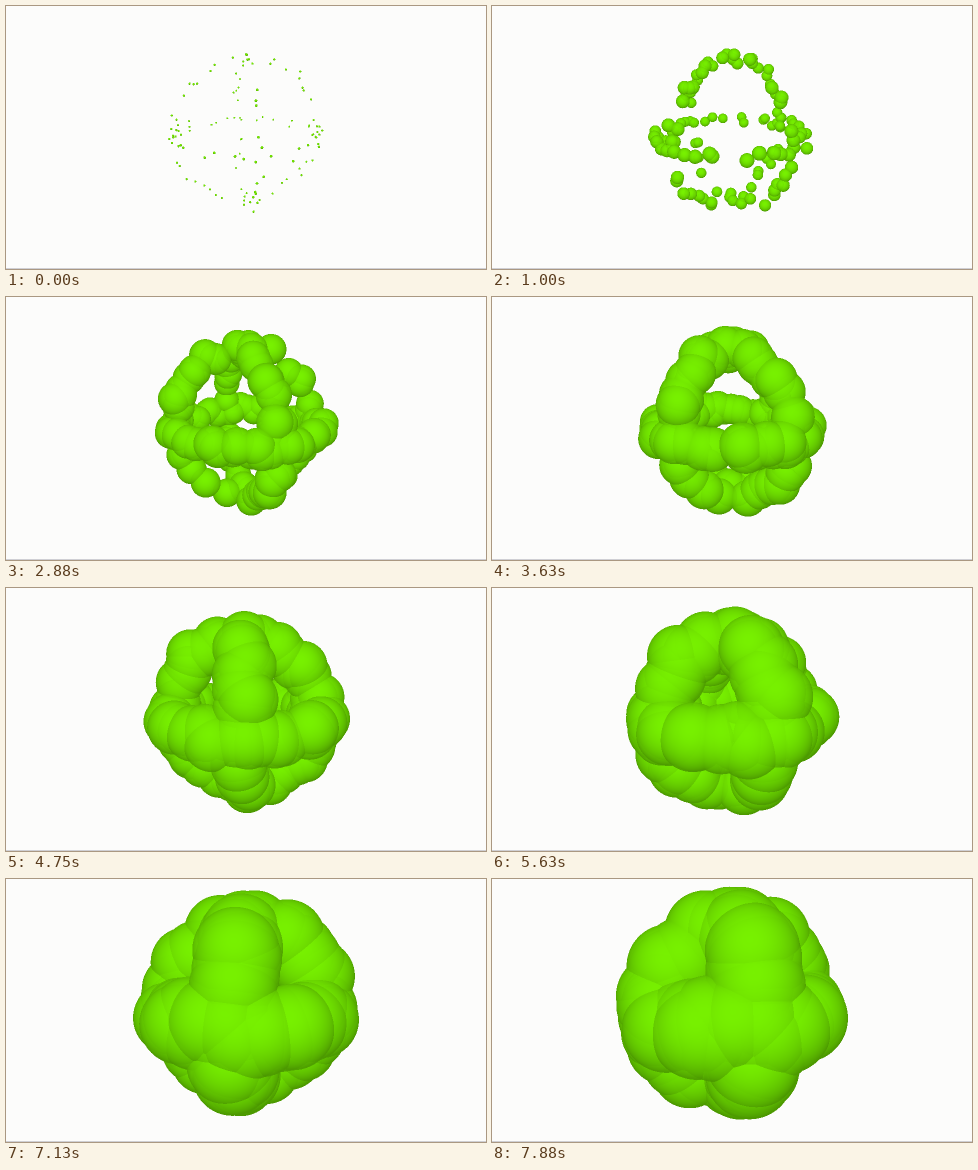
An HTML page with a canvas for the animation above (8 s loop, 480x263 px).

```html
<!DOCTYPE html>
<html lang="en">
<head>
<meta charset="utf-8">
<title>Growing balls on three circles</title>
<style>
  html, body { margin: 0; width: 100%; height: 100%; overflow: hidden; background: #fcfcfb; }
  canvas { display: block; width: 480px; height: 263px; }
  .rule { position: absolute; left: 0; top: 262px; width: 480px; height: 1px; background: #cfcfd4; }
</style>
</head>
<body>
<canvas width="960" height="526"></canvas>
<div class="rule"></div>
<script>
const LOOP = 8000, STEP = 125;
const SCALE = 2, W = 480 * SCALE, H = 263 * SCALE;
const CENTER = { x: 240, y: 128.5 };
const RADIUS = 72, PERSPECTIVE = 0.22, TILT = 0.266;
const LIFT = 0.04;                     // upright circles sit a little higher
const START = 8, SPIN = 4.45;          // degrees, degrees per step
const SIZE = 1.1, GROWTH = 0.59;       // ball radius, growth per step
const NOISE = 0.1;
const BLEND = 0.86;
const GREEN = { r: 122, g: 246 };
const LIGHT = { x: -0.06, y: 0.25, z: 0.966 };

const rad = deg => deg * Math.PI / 180;

let seed = 11;
function random() {
  seed = (seed * 16807) % 2147483647;
  return seed / 2147483647;
}
const jitter = () => (random() + random() - 1) * NOISE;

// Loosely even points on a circle, bunched around `waves` evenly spaced peaks.
// Axes: x to the right, y up, z towards the viewer.
function ring({ count, waves, peak, pull }, place) {
  return Array.from({ length: count }, (_, i) => {
    const u = rad(360 * (i + random()) / count);
    const t = u - pull / waves * Math.sin(waves * (u - rad(peak)));
    return place(Math.cos(t), Math.sin(t)).map(v => v + jitter());
  });
}

function meridian(spread, azimuth) {
  const a = rad(azimuth);
  return ring(spread, (c, s) => [c * Math.sin(a), s + LIFT, c * Math.cos(a)]);
}

const points = [
  ...ring({ count: 44, waves: 2, peak: 90, pull: 0.5 }, (c, s) => [s, 0, c]),
  ...meridian({ count: 36, waves: 2, peak: 150, pull: 0.4 }, START),
  ...meridian({ count: 38, waves: 4, peak: 45, pull: 0.4 }, START + 90)
];

const ctx = document.querySelector("canvas").getContext("2d");
const image = ctx.createImageData(W, H);
const pixels = image.data;
const depth = new Float32Array(W * H);

function project([x, y, z], turn, size) {
  const c = Math.cos(turn), s = Math.sin(turn);
  const rx = x * c + z * s, rz = z * c - x * s;
  const up = Math.cos(TILT) * y - Math.sin(TILT) * rz;
  const near = Math.sin(TILT) * y + Math.cos(TILT) * rz;
  const zoom = 1 / (1 - PERSPECTIVE * near);
  return {
    x: (CENTER.x + RADIUS * rx * zoom) * SCALE,
    y: (CENTER.y - RADIUS * up * zoom) * SCALE,
    r: size * zoom * SCALE,
    z: near * RADIUS
  };
}

// Paints a slightly translucent sphere wherever it is nearest to the viewer
function drawBall({ x, y, r, z }, size) {
  const top = Math.max(0, Math.floor(y - r)), bottom = Math.min(H - 1, Math.ceil(y + r));
  const left = Math.max(0, Math.floor(x - r)), right = Math.min(W - 1, Math.ceil(x + r));
  for (let py = top; py <= bottom; py++) {
    const ny = (y - py - 0.5) / r;
    for (let px = left; px <= right; px++) {
      const nx = (px + 0.5 - x) / r;
      const rest = 1 - nx * nx - ny * ny;
      if (rest < 0) continue;
      const nz = Math.sqrt(rest);
      const d = z + size * nz;
      const i = py * W + px;
      if (d <= depth[i]) continue;
      depth[i] = d;
      const lit = Math.max(0, nx * LIGHT.x + ny * LIGHT.y + nz * LIGHT.z);
      const shade = 0.62 + 0.36 * lit;
      const o = i * 4;
      const mix = pixels[o + 3] ? BLEND : 1;
      pixels[o] = GREEN.r * shade * mix + pixels[o] * (1 - mix);
      pixels[o + 1] = GREEN.g * shade * mix + pixels[o + 1] * (1 - mix);
      pixels[o + 3] = 255;
    }
  }
}

function draw(step) {
  const size = SIZE + GROWTH * step;
  const turn = rad(SPIN * step);
  pixels.fill(0);
  depth.fill(-1e4);
  points.map(p => project(p, turn, size))
    .sort((a, b) => a.z - b.z)
    .forEach(ball => drawBall(ball, size));
  ctx.putImageData(image, 0, 0);
}

let shown = -1;
const begin = performance.now();
function tick() {
  const step = Math.floor(((performance.now() - begin) % LOOP) / STEP);
  if (step !== shown) draw(shown = step);
  requestAnimationFrame(tick);
}
tick();
</script>
</body>
</html>
```
